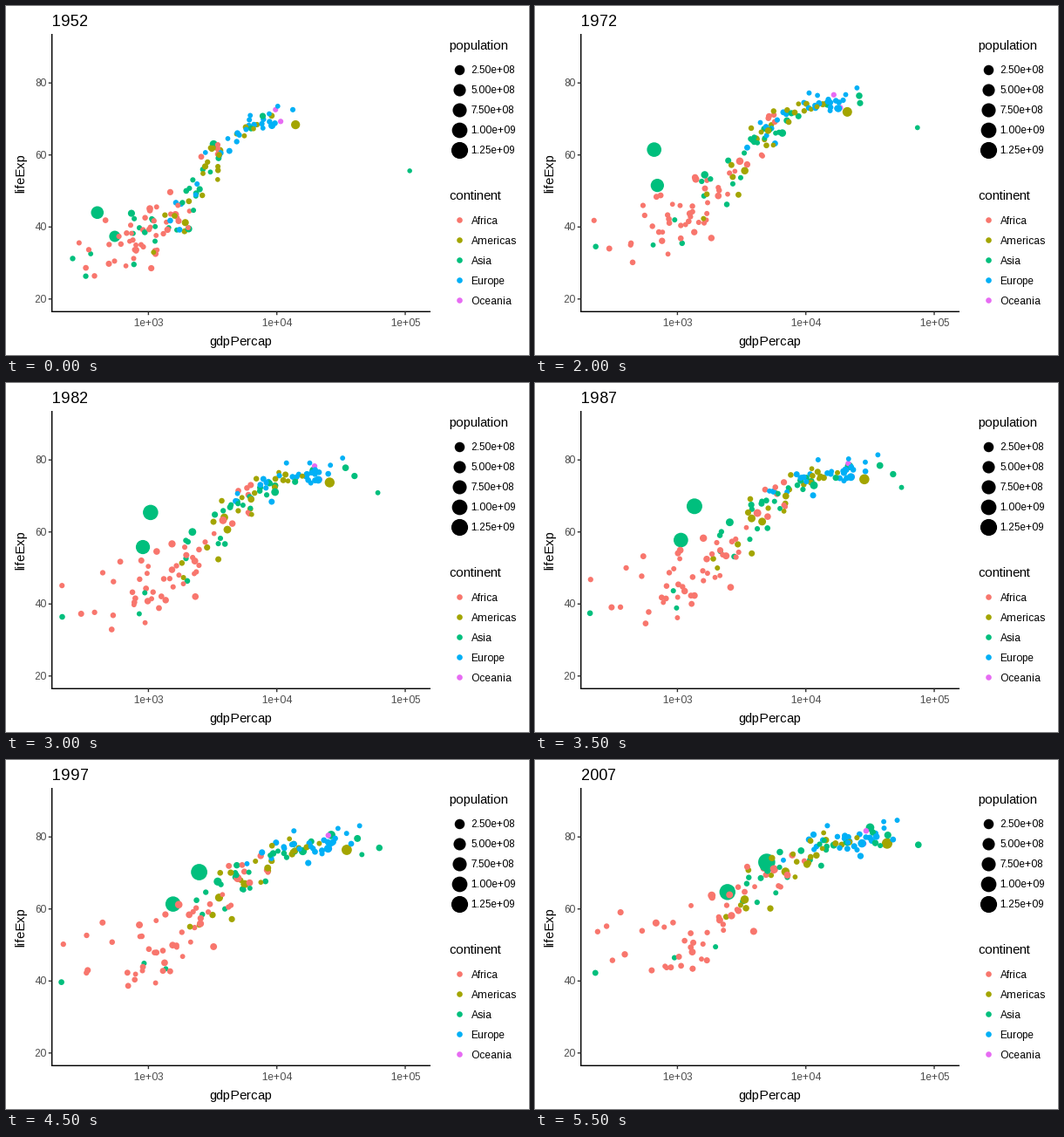
A matplotlib script for the animation above (6 s loop, 600 by 400 pixels).

```python
import matplotlib.pyplot as plt
import numpy as np
from matplotlib.animation import FuncAnimation

plt.rcParams.update({
    "font.family": "Liberation Sans",
    "text.hinting": "force_autohint",
    "text.hinting_factor": 1,
})

PX = 0.72  # points per pixel at 100 dpi
FRAMES = 12
COLORS = {
    "Africa": "#F8766D",
    "Americas": "#A3A500",
    "Asia": "#00BF7D",
    "Europe": "#00B0F6",
    "Oceania": "#E76BF3",
}

# Standout bubbles: first and last (income, life, millions), easing powers.
LEADERS = [
    ("Asia", (400, 44, 556), (4959, 73, 1319), (1.6, 0.5)),
    ("Asia", (547, 37.4, 372), (2452, 64.7, 1110), (1.8, 0.65)),
    ("Americas", (13990, 68.4, 158), (42952, 78.2, 301), (1, 1)),
    ("Asia", (3217, 63, 86), (31656, 82.6, 127), (0.4, 0.55)),
    ("Asia", (108382, 55.6, 0.2), (38000, 77.6, 2.5), (1, 0.6)),
]

# Countries per continent, then first and last mean and spread of log income.
CLOUDS = {
    "Oceania": (2, (4.01, 0.02), (4.46, 0.06)),
    "Africa": (52, (3.0, 0.27), (3.24, 0.42)),
    "Americas": (24, (3.5, 0.23), (3.92, 0.28)),
    "Asia": (29, (3.15, 0.37), (3.85, 0.53)),
    "Europe": (30, (3.69, 0.26), (4.35, 0.25)),
}


def mix(start, end, t):
    return start + (end - start) * t


def to_x(log_income):
    return 163.4 + 147.3 * (log_income - 3)


def to_y(life):
    return 88.2 + 4.127 * (80 - life)


def marker_area(population):
    share = np.clip(population / 1319, 0, 1)
    diameter = 2.845 * (1 + 5 * np.sqrt(share)) + 2.5
    return (diameter * PX) ** 2


def standard_normal(rng, n):
    z = rng.normal(size=n)
    return np.clip((z - z.mean()) / z.std(), -2, 2)


def drifting_normal(rng, n, t):
    """Normal scores that slowly reshuffle as t goes from 0 to 1."""
    angle = 0.9 * t
    return (np.cos(angle) * standard_normal(rng, n)
            + np.sin(angle) * standard_normal(rng, n))


def leader_points(t):
    rows = []
    for _, first, last, (income_ease, life_ease) in LEADERS:
        income = mix(np.log10(first[0]), np.log10(last[0]), t ** income_ease)
        rows.append((income, mix(first[1], last[1], t ** life_ease),
                     mix(first[2], last[2], t)))
    return np.array(rows).T


def cloud_points(t):
    rng = np.random.default_rng(52)
    growth = t ** 0.65
    income = np.concatenate([
        mix(first[0], last[0], growth)
        + mix(first[1], last[1], growth) * drifting_normal(rng, count, t)
        for count, first, last in CLOUDS.values()])

    # Life expectancy follows a logistic curve that rises and flattens.
    steepness = mix(5, 3.2, t)
    share = 1 / (1 + np.exp(-steepness * (income - mix(3.45, 3.5, t))))
    spread = (1.2 + 4.5 * (1 - share)) * (1 + 0.4 * t)
    noise = drifting_normal(rng, len(income), t)
    life = mix(mix(35, 45, t), mix(73, 81, t), share) + spread * noise

    log_population = 0.7 + 0.35 * t + 0.5 * standard_normal(rng, len(income))
    return np.array([income, life, 10 ** log_population])[:, DRAW_ORDER]


cloud_names = np.repeat(list(CLOUDS), [cloud[0] for cloud in CLOUDS.values()])
hidden = CLOUDS["Oceania"][0]  # drawn beneath the other clouds
shuffled = np.random.default_rng(7).permutation(np.arange(hidden, len(cloud_names)))
DRAW_ORDER = np.concatenate([np.arange(hidden), shuffled])
point_colors = [COLORS[leader[0]] for leader in LEADERS]
point_colors += [COLORS[name] for name in cloud_names[DRAW_ORDER]]

fig = plt.figure(figsize=(6, 4), dpi=100, facecolor="white")
ax = fig.add_axes([0, 0, 1, 1])
ax.set(xlim=(0, 600), ylim=(400, 0))
ax.axis("off")


def label(x, y, text, size=11.73, color="black", **kwargs):
    return ax.text(x, y, text, fontsize=size * PX, color=color,
                   va="baseline", **kwargs)


def line(xs, ys, color="black"):
    ax.plot(xs, ys, color=color, lw=1.42 * PX, snap=False, solid_capstyle="butt")


def dots(x, y, area, color):
    return ax.scatter(x, y, s=area, c=color, linewidths=0, zorder=3)


line([52.7, 52.7], [32, 351])
line([52, 487], [350.3, 350.3])
for life in range(20, 81, 20):
    y = to_y(life)
    line([48.8, 52.5], [y, y], "#333333")
    label(46.5, y + 4.2, str(life), color="#4D4D4D", ha="right")
for power in (3, 4, 5):
    x = to_x(power)
    line([x, x], [350.5, 354.2], "#333333")
    label(x, 367, f"1e+0{power}", color="#4D4D4D", ha="center")

label(269, 389, "gdpPercap", 14.67, ha="center")
label(21, 191, "lifeExp", 14.67, ha="center", rotation=90, rotation_mode="anchor")
label(508, 50, "population", 14.67)
label(508, 222, "continent", 14.67)
for i in range(5):
    y = 72.6 + 23.04 * i
    population = 250 * (i + 1)
    dots([520], [y], marker_area(population), "black")
    label(533.5, y + 4.6, f"{population * 1e6:.2e}")
for i, (name, color) in enumerate(COLORS.items()):
    y = 245.2 + 23.04 * i
    dots([520.2], [y], (6.6 * PX) ** 2, color)
    label(533.5, y + 4.6, name)

title = label(52.5, 23, "", 17.6)
start = np.zeros(len(point_colors))
bubbles = dots(start, start, start, point_colors)


def update(frame):
    t = frame / (FRAMES - 1)
    income, life, population = np.hstack([leader_points(t), cloud_points(t)])
    bubbles.set_offsets(np.column_stack([to_x(income), to_y(life)]))
    bubbles.set_sizes(marker_area(population))
    title.set_text(str(1952 + 5 * frame))
    return bubbles, title


animation = FuncAnimation(fig, update, frames=FRAMES, interval=500,
                          repeat=True, repeat_delay=0)
plt.show()
```
